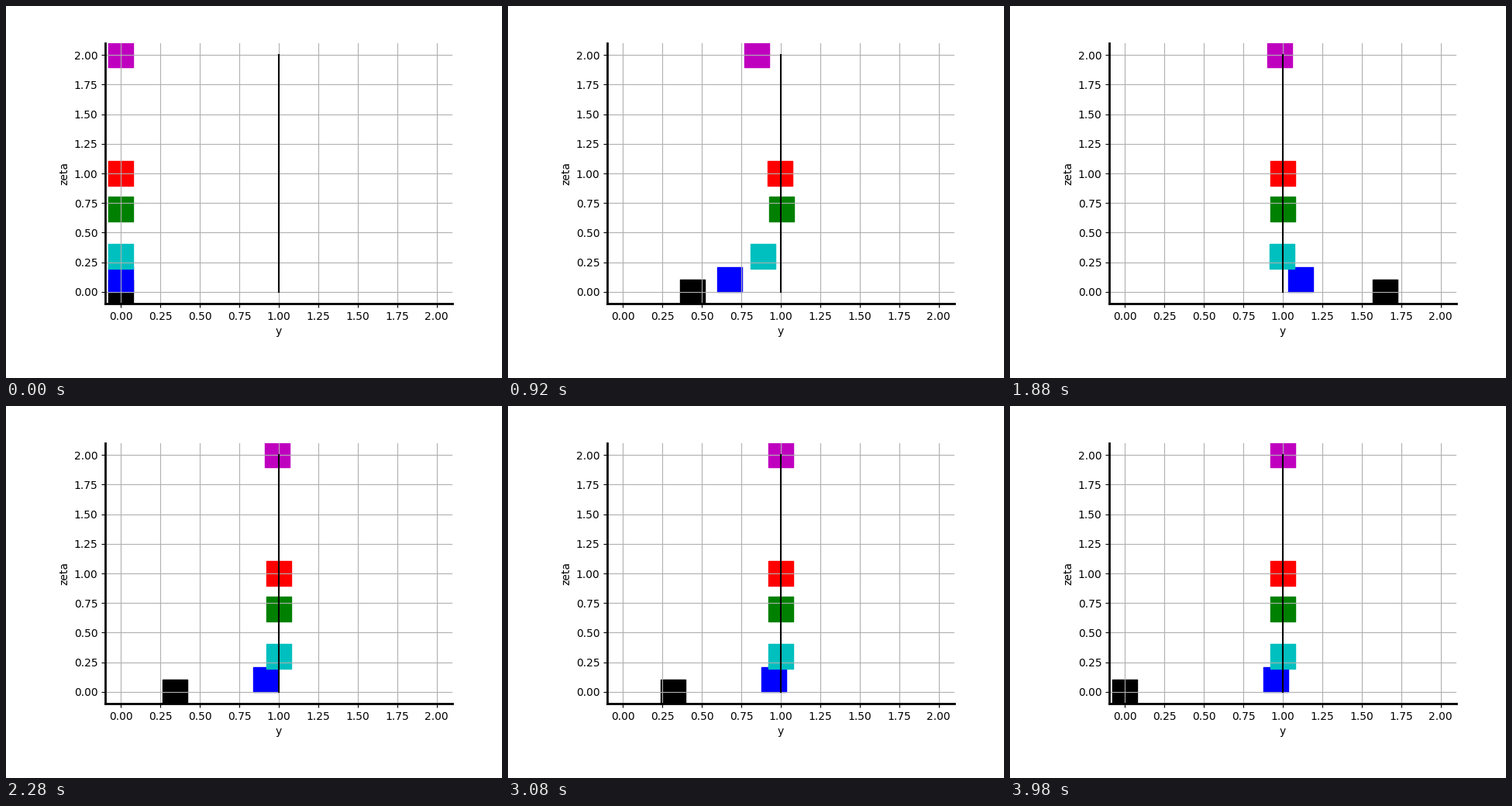
These frames come from a looping animation (640x480 px, 4 s). A matplotlib script:

```python
import numpy as np
import matplotlib.pyplot as plt
from matplotlib.animation import FuncAnimation

FRAMES = 200
INTERVAL = 20  # ms
DAMPING = {0.0: "k", 0.1: "b", 0.3: "c", 0.7: "g", 1.0: "r", 2.0: "m"}

t = np.linspace(0, 10 * np.pi, FRAMES)


def step_response(zeta):
    """Unit step response of a second-order system with unit natural frequency."""
    if zeta == 1:
        return 1 - np.exp(-t) * (1 + t)
    root = np.sqrt(complex(zeta**2 - 1))
    p, q = -zeta + root, -zeta - root
    return (1 + (q * np.exp(p * t) - p * np.exp(q * t)) / (p - q)).real


fig = plt.figure(figsize=(6.4, 4.8), dpi=100)
ax = fig.add_axes([0.2, 0.2, 0.7, 0.7])
ax.set(xlim=(-0.1, 2.1), ylim=(-0.1, 2.1), xlabel="y", ylabel="zeta")
ax.grid(True)
for side in ("top", "right"):
    ax.spines[side].set_visible(False)
for side in ("left", "bottom"):
    ax.spines[side].set_linewidth(2)

ax.plot([1, 1], [0, 2], color="k", lw=1.5)

# Scatter sits below the grid, so grid lines show through the squares.
blocks = [
    (ax.scatter([0], [zeta], s=500, marker="s", color=color), zeta, step_response(zeta))
    for zeta, color in DAMPING.items()
]


def update(frame):
    for block, zeta, y in blocks:
        block.set_offsets([[y[frame], zeta]])
    return [block for block, _, _ in blocks]


anim = FuncAnimation(fig, update, frames=FRAMES, interval=INTERVAL,
                     repeat=True, repeat_delay=0, blit=False)

plt.show()
```
